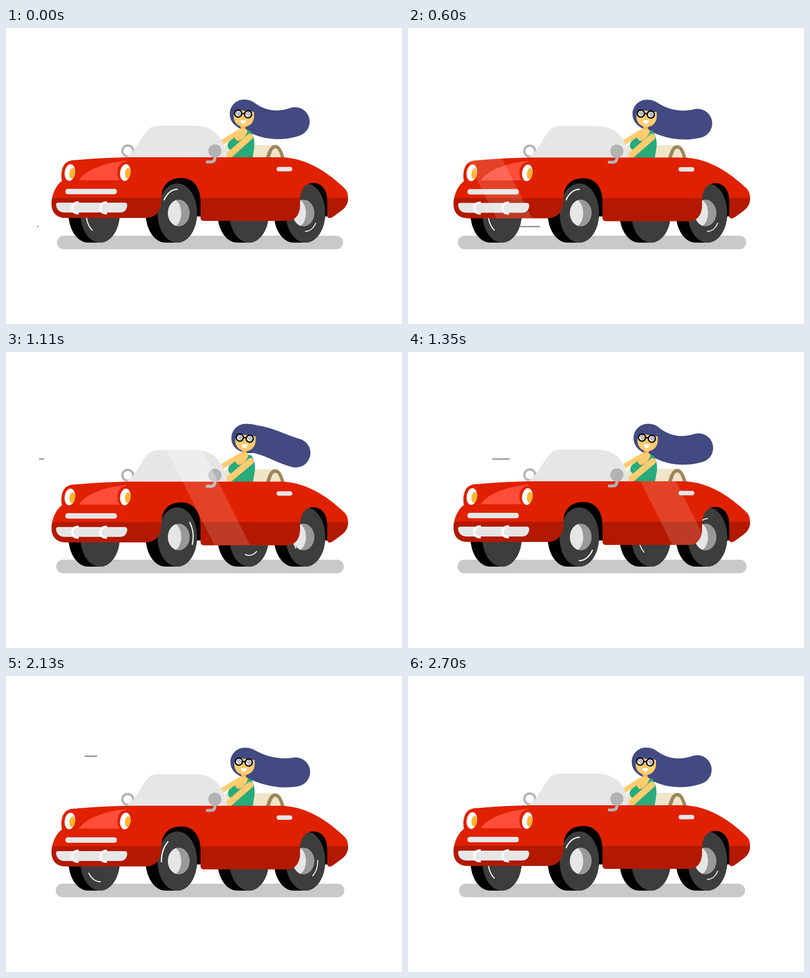
An HTML page for the animation above (2.73 s loop, 800 px wide and 600 px high).

```html
<!DOCTYPE html>
<html lang="en">
<head>
<meta charset="utf-8">
<title>Red convertible</title>
<style>
  html, body { margin: 0; width: 100%; height: 100%; overflow: hidden; background: #fff; }
  svg { display: block; width: 100vw; height: 100vh; }
</style>
</head>
<body>
<svg viewBox="0 0 800 600">
  <defs>
    <path id="body" d="M92 355C93 335 102 318 113 310C110 296 112 269 136 268C170 265 205 263 245 262H555C612 263 655 298 682 323C690 330 691 338 691 345C691 360 682 367 675 372L660 383Q650 389 649 380V349C649 327 637 314 621 314C603 314 594 330 594 350V358C594 378 584 391 568 391H400Q393 391 393 383V352C393 322 378 304 354 304C330 304 314 318 314 345C314 370 304 385 280 385H122C100 385 92 372 92 355Z"/>
    <path id="screen" d="M243 262C265 246 271 225 284 209Q293 198 306 198H382C420 198 440 222 447 262Z"/>
    <circle id="mirror" cx="422" cy="249" r="13.3"/>
    <clipPath id="inBody"><use href="#body"/></clipPath>
    <clipPath id="inGlass"><use href="#screen"/><use href="#mirror"/></clipPath>
    <g id="lamp">
      <ellipse rx="16" ry="22" fill="#e02100"/>
      <ellipse rx="10.5" ry="17" fill="#fff" transform="rotate(8)"/>
      <ellipse cx="5" cy="1" rx="5.6" ry="11" fill="#ffb52e" transform="rotate(6)"/>
    </g>
    <g id="lens">
      <circle r="7.2" fill="#f2f2f2" stroke="#000" stroke-width="2.6"/>
      <path d="M-4 -3L3 4.5M-1 -5L5 2" stroke="#777" stroke-width="1.4"/>
    </g>
    <path id="guard" d="M147 353.5C138 353 134 358 134 365S138 376 147 375.5" fill="none" stroke="#fff" stroke-width="4.5"/>
    <clipPath id="hubEdge"><ellipse rx="22" ry="27"/></clipPath>
    <g id="hub">
      <ellipse rx="22" ry="27" fill="#999"/>
      <ellipse cx="-14" rx="19" ry="29" fill="#e6e6e6" clip-path="url(#hubEdge)"/>
    </g>
    <path id="stripe" d="M-32 198H40L137 392H65Z" fill="#fff"/>
  </defs>

  <rect id="shadow" y="421" height="27.5" rx="13.5" fill="#c9c9c9"/>
  <g id="streaks" stroke="#999" stroke-width="3" stroke-linecap="round"></g>
  <path d="M314 300H396V382H314ZM592 310H652V382H592Z"/>
  <g id="wheels"></g>
  <use href="#hub" x="349" y="375"/>
  <use href="#hub" x="601" y="375"/>
  <g id="marks" fill="none" stroke="#fff" stroke-linecap="round"></g>

  <g id="seat">
    <circle cx="246" cy="249" r="11" fill="#fff" stroke="#b3b3b3" stroke-width="4.5"/>
    <path d="M443 237H545V266H443Z" fill="#efe5c8"/>
    <path d="M525 264C530 246 535 237 544 237S558 247 563 264Z" fill="#9d855a"/>
    <path d="M532.5 264C537 250 539 244 544 244S552 250 556 264Z" fill="#efe5c8"/>
  </g>

  <g id="driver">
    <path id="hair" fill="#434a82"/>
    <path d="M474 196H484V210H474Z" fill="#f2b558"/>
    <path d="M472 206C480 202 488 204 491 213L478 233L457 229C460 215 465 209 472 206Z" fill="#ffcc70"/>
    <path d="M461 217C462 226 467 230 471 229C479 225 486 218 488 207L494 209C502 220 503 235 501 245L498 266H446C452 255 455 250 453 247C446 243 446 233 453 228C458 225 459 221 461 217Z" fill="#28ab7c"/>
    <path d="M470 222Q471 227 469 229" fill="none" stroke="#f2a950"/>
    <g fill="none" stroke="#ffcc70" stroke-linecap="round">
      <path d="M472 209.500L432 235" stroke-width="10"/>
      <path d="M492.500 220.500L447 261.500" stroke-width="13"/>
    </g>
    <path d="M460 176Q462 168 475 167L501 170V180A20.500 20.500 0 0 1 460 180Z" fill="#ffcc70"/>
    <path d="M478 178V183H480" fill="none" stroke="#f2a950" stroke-width="1.5"/>
    <path d="M473 187H485.500Q484 194 479 194T473 187Z" fill="#fff"/>
    <path d="M475 173L484 174" stroke="#000" stroke-width="2.5"/>
    <use href="#lens" x="469" y="173.500"/>
    <use href="#lens" x="489" y="175"/>
  </g>

  <g id="car">
    <use href="#screen" fill="#e6e6e6"/>
    <use href="#body" fill="#e02100"/>
    <path d="M80 344H700V400H80Z" fill="#b31900" clip-path="url(#inBody)"/>
    <path d="M147 308.500C161 287 200 273 243 269V308.500Z" fill="#ff4d3a"/>
    <use href="#lamp" x="129" y="293"/>
    <use href="#lamp" x="241" y="293"/>
    <rect x="120" y="326" width="104" height="11" rx="5" fill="#e6e6e6"/>
    <path d="M101 358Q101 354 106 354H240Q245 354 245 360Q243 374 230 374H119Q103 374 101 358Z" fill="#e6e6e6"/>
    <use href="#guard"/>
    <use href="#guard" x="57"/>
    <rect x="546.5" y="281.5" width="32" height="9" rx="4.5" fill="#e6e6e6"/>
    <path d="M422 258V263Q422 271.500 413 271.500H406.500" fill="none" stroke="#b3b3b3" stroke-width="6" stroke-linecap="round"/>
    <use href="#mirror" fill="#b3b3b3"/>
    <g clip-path="url(#inBody)" opacity=".15"><use class="shine" href="#stripe"/></g>
    <g clip-path="url(#inGlass)" opacity=".32"><use class="shine" href="#stripe"/></g>
  </g>
</svg>
<script>
const LOOP = 2730, STEP = 30, TURN = 300;
const TYRE = { rx: 40, ry: 60, y: 375, depth: 24 };
const STREAK_END = 300;

const $ = id => document.getElementById(id);
const set = (el, attrs) => { for (const k in attrs) el.setAttribute(k, attrs[k]); };
const add = (parent, tag, attrs = {}) => {
  const el = document.createElementNS('http://www.w3.org/2000/svg', tag);
  set(el, attrs);
  return parent.appendChild(el);
};
const rad = deg => deg * Math.PI / 180;
const mix = (a, b, k) => a + (b - a) * k;
const wave = (t, period) => (1 - Math.cos(2 * Math.PI * t / period)) / 2;

function makeWheel(x, scale, phase) {
  const { rx, ry, y, depth } = TYRE;
  const tyre = `M${x - depth} ${y - ry}h${depth}a${rx} ${ry} 0 0 1 0 ${2 * ry}h${-depth}a${rx} ${ry} 0 0 1 0 ${-2 * ry}Z`;
  add($('wheels'), 'path', { d: tyre });
  add($('wheels'), 'ellipse', { cx: x, cy: y, rx, ry, fill: '#3d3d3d' });
  const mark = add($('marks'), 'path', { 'stroke-width': 3 * scale });
  return { x, scale, phase, mark };
}
const wheels = [
  makeWheel(190, .7, 180),
  makeWheel(491, .62, 0),
  makeWheel(346, .8, 90),
  makeWheel(605, .62, 270)
];

const streaks = [
  { y: 402.5, x: 63.5, start: -3, speed: .335 },
  { y: 217, x: 33.5, start: 1030, speed: .533 },
  { y: 162.5, x: 63.5, start: 1757, speed: .32 }
];
for (const s of streaks) s.line = add($('streaks'), 'line', { y1: s.y, y2: s.y });

// Highlight running counter-clockwise around the tyre
function arc({ x, scale, phase }, t) {
  const rx = TYRE.rx * scale, ry = TYRE.ry * scale;
  const start = phase + 360 * t / TURN;
  const at = deg => `${x + rx * Math.cos(rad(deg))} ${TYRE.y - ry * Math.sin(rad(deg))}`;
  return `M${at(start)}A${rx} ${ry} 0 0 0 ${at(start + 56)}`;
}

// Tail of hair with a round tip; lift goes from 0 (wavy) to 1 (streaming)
function hair(lift) {
  const r = 29.5, tilt = rad(mix(-20, 20, lift));
  const cx = 584 - lift, cy = 190 + 13 * lift;
  const tip = (along, side) => {
    const px = cx + along * Math.cos(tilt) - side * Math.sin(tilt);
    const py = cy + along * Math.sin(tilt) + side * Math.cos(tilt);
    return `${px} ${py}`;
  };
  return `M452 174C452 158 465 145 481 145
    C491 145 498 ${148 - 2.5 * lift} 504 ${153 - 6.5 * lift}
    C${528 + 5 * lift} ${170 - 25 * lift} ${tip(-22, -r)} ${tip(0, -r)}
    A${r} ${r} 0 0 1 ${tip(0, r)}
    C${tip(-32, r)} 526 ${228 - 24 * lift} 497 ${214 - 13 * lift}
    C480 207 452 200 452 174Z`;
}

function draw(t) {
  const spread = 3 * wave(t, 900);
  set($('shadow'), { x: 103 - spread, width: 578 + 2 * spread });

  for (const w of wheels) set(w.mark, { d: arc(w, t) });

  for (const { x, start, speed, line } of streaks) {
    const run = Math.max(0, t - start) * speed;
    const x1 = Math.min(STREAK_END, x + .81 * run);
    const x2 = Math.min(STREAK_END, x + run);
    set(line, { x1, x2, visibility: run > 0 && x1 < STREAK_END ? 'visible' : 'hidden' });
  }

  const bob = `translate(0 ${1.3 * wave(t, 337.5)})`;
  set($('car'), { transform: bob });
  set($('seat'), { transform: bob });
  for (const el of document.querySelectorAll('.shine')) set(el, { x: .47 * t - 165 });

  set($('driver'), { transform: `rotate(${2.2 * wave(t, 2700)} 470 270)` });
  set($('hair'), { d: hair(wave(t, 675)) });
}

function frame(now) {
  draw(Math.floor(now % LOOP / STEP) * STEP);
  requestAnimationFrame(frame);
}
draw(0);
requestAnimationFrame(frame);
</script>
</body>
</html>
```
